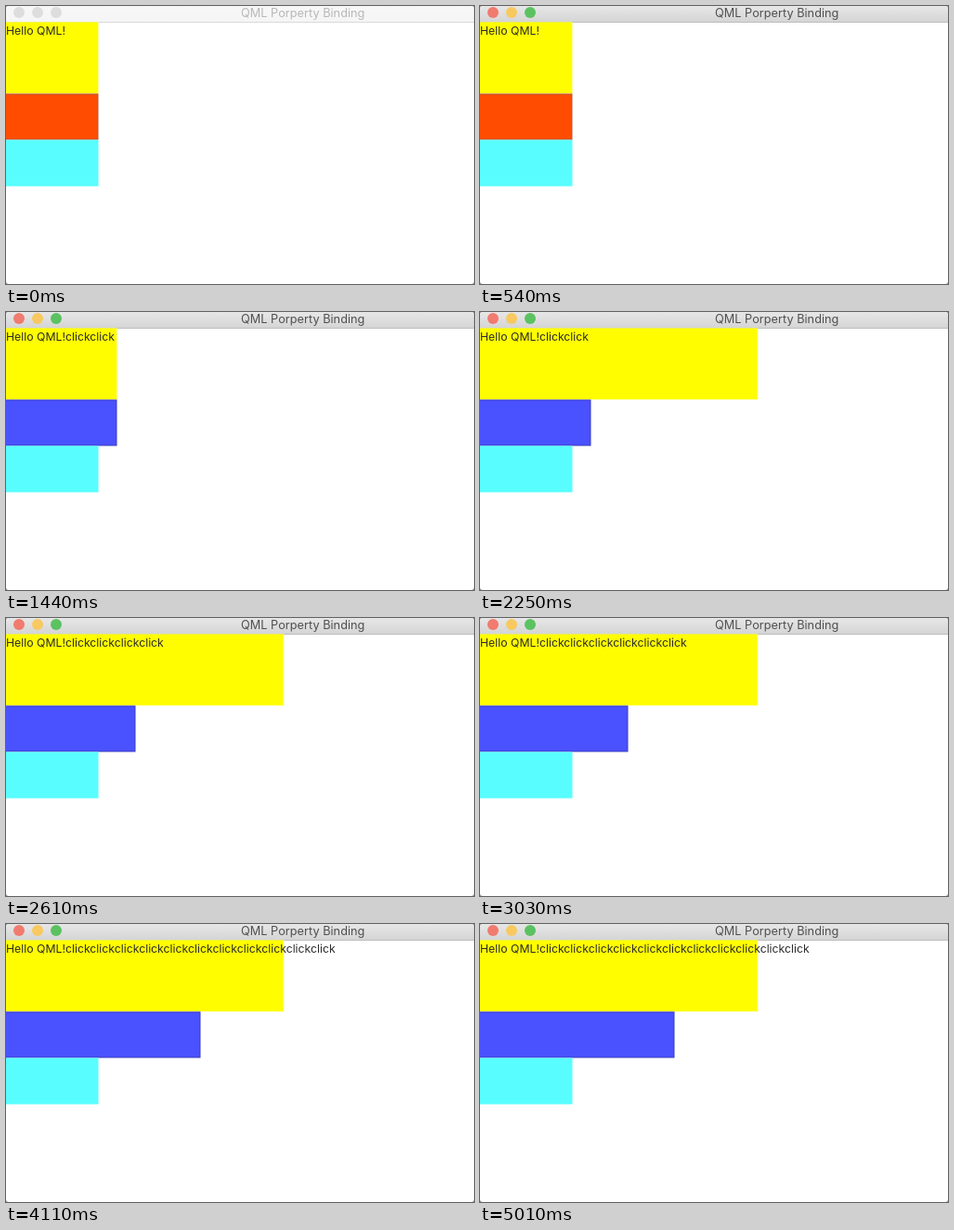
An HTML page with a canvas for the animation above (5.13 s loop, 504 by 300 pixels).

```html
<!DOCTYPE html>
<html lang="en">
<head>
<meta charset="utf-8">
<title>QML Porperty Binding</title>
<style>
html, body { margin: 0; width: 100%; height: 100%; overflow: hidden; background: #8a8a8a; }
canvas { display: block; }
</style>
</head>
<body>
<canvas id="stage" width="504" height="300"></canvas>
<script>
const ctx = document.getElementById('stage').getContext('2d');
const LOOP = 5130;
const ACTIVATE = 540;
const UNBIND = 1530; // the yellow width stops following the clicked box
const BURST = 2280;
const clicks = [900, 1050, ...Array.from({ length: 9 }, (_, i) => BURST + i * 206)];

function box(x, y, w, h, color) {
  ctx.fillStyle = color;
  ctx.fillRect(x, y, w, h);
}

function text(str, x, y, size, color) {
  ctx.font = `${size}px Inter, sans-serif`;
  ctx.fillStyle = color;
  ctx.fillText(str, x, y);
}

function titleBar(active) {
  const shade = ctx.createLinearGradient(0, 0, 0, 17);
  shade.addColorStop(0, active ? '#e7e7e7' : '#f7f7f7');
  shade.addColorStop(1, active ? '#d5d5d5' : '#f5f5f5');
  box(0, 0, 504, 17, shade);
  box(0, 17, 504, 1, active ? '#bdbdbd' : '#dadada');
  ['#f07b6e', '#f7c960', '#5bc261'].forEach((color, i) => {
    ctx.fillStyle = active ? color : '#dddddd';
    ctx.beginPath();
    ctx.arc(14 + 20 * i, 7, 6, 0, Math.PI * 2);
    ctx.fill();
  });
  text('QML Porperty Binding', 253, 12, 12.75, active ? '#505050' : '#b8b8b8');
}

function draw(t) {
  const count = clicks.filter(at => t >= at).length;
  const width = 99.5 + 10 * count;
  const yellowWidth = t < UNBIND ? width : 299;

  ctx.clearRect(0, 0, 504, 300);
  ctx.save();
  ctx.beginPath();
  ctx.roundRect(0, 0, 504, 300, 3);
  ctx.clip();
  box(0, 0, 504, 300, '#ffffff');
  titleBar(t >= ACTIVATE);

  // A pale rim softens the yellow edges.
  box(0, 17.5, yellowWidth + 0.5, 77.5, '#ffff9c');
  box(0, 17.5, yellowWidth - 0.5, 76.5, '#fffd00');
  box(0, 94.5, width, 50, count ? '#3b3fbd' : '#b55a3c');
  box(0, 95.5, width - 1, 48, count ? '#4a51ff' : '#ff4c00');
  box(0, 144.5, 99.5, 50, '#58feff');
  text('Hello QML!' + 'click'.repeat(count), 0, 31, 12.27, '#2c2c2c');
  ctx.restore();
}

function tick() {
  draw(performance.now() % LOOP);
  requestAnimationFrame(tick);
}
tick();
</script>
</body>
</html>
```
